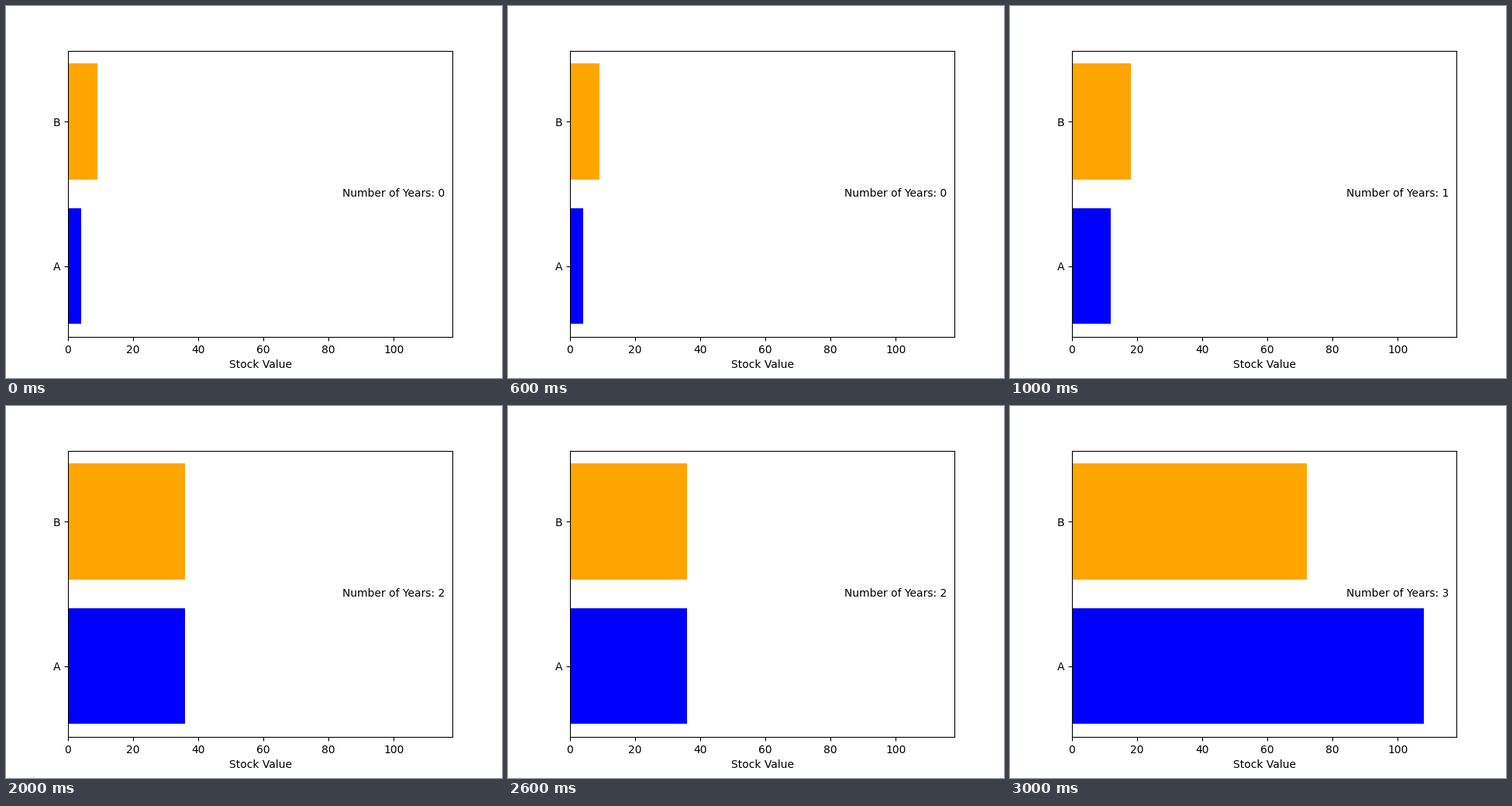
Write a matplotlib script that moves like this. It is 640 px wide and 480 px high and loops after 4000 ms.

```python
import matplotlib.pyplot as plt
from matplotlib.animation import FuncAnimation

YEARS = 4
START = (4, 9)
GROWTH = (3, 2)


def values(year):
    return [start * rate ** year for start, rate in zip(START, GROWTH)]


fig, ax = plt.subplots(figsize=(6.4, 4.8), dpi=100)
bars = ax.barh(["A", "B"], values(0), color=["blue", "orange"])
ax.set_xlim(0, max(values(YEARS - 1)) + 10)
ax.set_xlabel("Stock Value")
label = ax.text(0.98, 0.5, "", transform=ax.transAxes, ha="right", va="center")


def update(year):
    for bar, value in zip(bars, values(year)):
        bar.set_width(value)
    label.set_text(f"Number of Years: {year}")
    return [*bars, label]


anim = FuncAnimation(fig, update, frames=YEARS, interval=1000, repeat=True,
                     repeat_delay=0)
plt.show()
```
